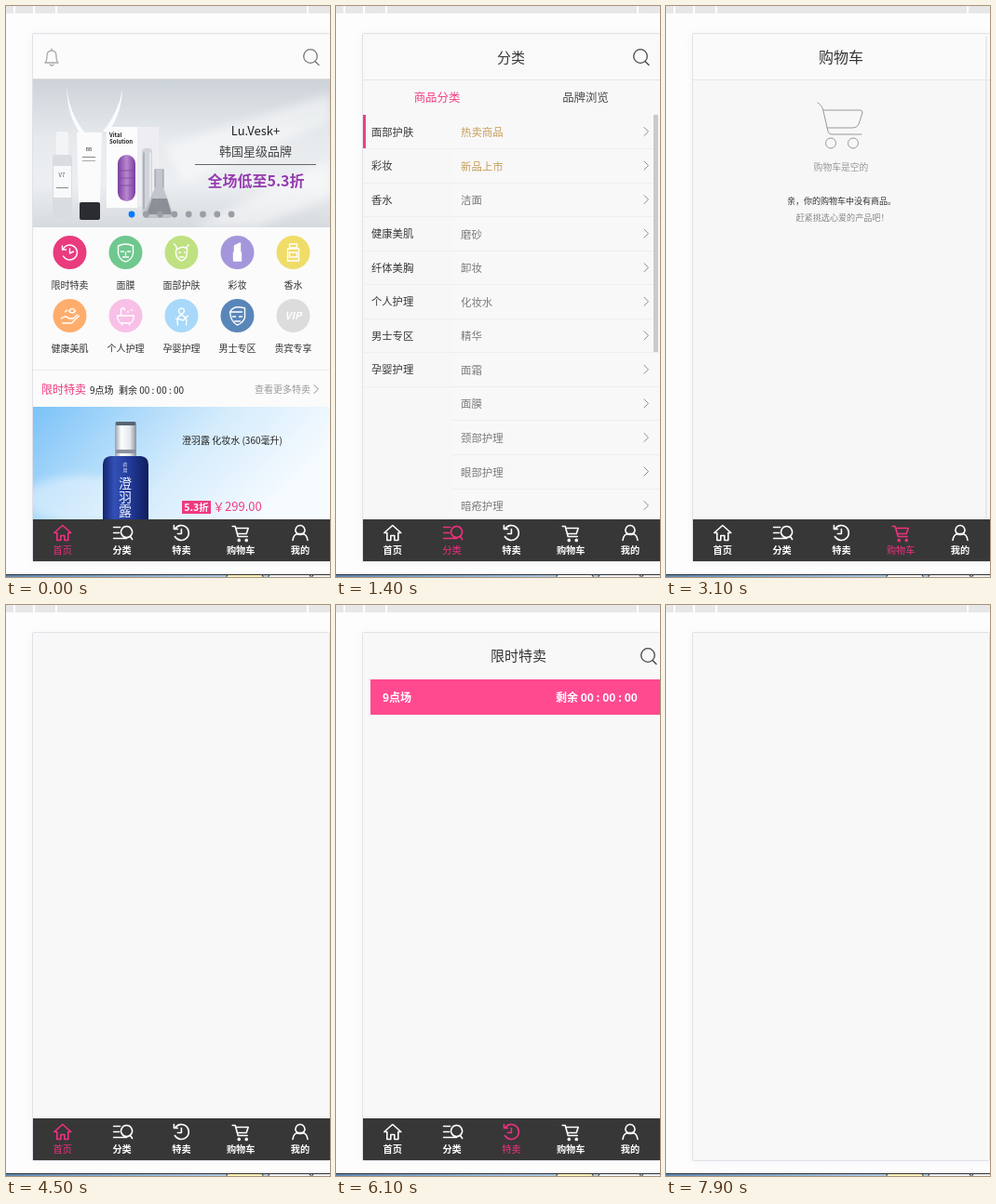
An HTML page that plays this animation: 348x614 px, repeating every 8 s.

```html
<!DOCTYPE html>
<html lang="zh-CN">
<head>
<meta charset="utf-8">
<title>商城</title>
<style>
html, body { margin: 0; width: 100%; height: 100%; overflow: hidden; background: #fdfdfd; }
svg { display: block; width: 348px; height: 614px; font-family: "Noto Sans CJK SC", "Noto Sans CJK", "Noto Sans", sans-serif; }
.line { fill: none; stroke-linecap: round; stroke-linejoin: round; }
.tab { color: #fff; font-weight: 700; }
.tab.on { color: #f0307f; font-weight: 400; }
</style>
</head>
<body>
<svg id="stage" viewBox="0 0 348 614" xmlns="http://www.w3.org/2000/svg"></svg>
<script>
const PINK = '#ef3a80', LOOP = 8000, STEP = 100;

const text = (x, y, size, fill, str, extra = '') =>
  `<text x="${x}" y="${y}" font-size="${size}" fill="${fill}" ${extra}>${str}</text>`;
const mid = (x, y, size, fill, str, extra = '') =>
  text(x, y, size, fill, str, 'text-anchor="middle" ' + extra);
const rect = (x, y, w, h, fill, extra = '') =>
  `<rect x="${x}" y="${y}" width="${w}" height="${h}" fill="${fill}" ${extra}/>`;
const circle = (x, y, r, fill, extra = '') =>
  `<circle cx="${x}" cy="${y}" r="${r}" fill="${fill}" ${extra}/>`;
const line = (d, color, width = 1, extra = '') =>
  `<path class="line" d="${d}" stroke="${color}" stroke-width="${width}" ${extra}/>`;
const shape = (d, fill, extra = '') => `<path d="${d}" fill="${fill}" ${extra}/>`;
const at = (x, y, body, extra = '') => `<g transform="translate(${x} ${y})" ${extra}>${body}</g>`;
const chevron = (x, y) => line(`M${x} ${y - 4.5}l4.5 4.5l-4.5 4.5`, '#888');
const gradient = (id, stops, dir = 'x2="1" y2="0"') =>
  `<linearGradient id="${id}" ${dir}>` + stops.map(([o, c]) =>
    `<stop offset="${o}" stop-color="${c}"/>`).join('') + '</linearGradient>';

const search = color => circle(327, 54, 7.3, 'none', `stroke="${color}" stroke-width="1.3"`) +
  line('M332 59.5l4 4', color, 1.4);
const header = (title, size = 15) => rect(29, 31, 319, 48, '#fafafa') + rect(29, 79, 319, 1, '#e6e6e6') +
  mid(188, 61, size, '#333', title);

const defs = `<defs>
  ${gradient('studio', [[0, '#cdd3d8'], [.4, '#e6eaed'], [.7, '#eceff1'], [1, '#d6dade']], 'x2="0" y2="1"')}
  ${gradient('soft', [[0, '#e7e9ec'], [1, '#d9dde1']])}
  ${gradient('sky', [[0, '#7cc2f8'], [.3, '#a9d8fa'], [.6, '#d5ecfc'], [1, '#f6fbff']], 'x2="1" y2=".35"')}
  ${gradient('cap', [[0, '#9aa0aa'], [.3, '#fff'], [.7, '#e4e7ec'], [1, '#8a919c']])}
  ${gradient('glass', [[0, '#14246f'], [.25, '#3350b5'], [.6, '#213a98'], [1, '#101d5c']])}
  ${gradient('violet', [[0, '#7b3f9d'], [.5, '#b887cf'], [1, '#7a3c9c']])}
  ${gradient('floor', [[0, '#5f86b0'], [.6, '#a8c4de'], [1, '#c4d7e6']])}
  <filter id="blur" x="-20%" y="-20%" width="140%" height="140%"><feGaussianBlur stdDeviation="5"/></filter>
  <clipPath id="banner"><path d="M29 79h319v159H29z"/></clipPath>
  <clipPath id="deal"><path d="M29 431h319v121H29z"/></clipPath>
</defs>`;

function firstSlide() {
  const glow = shape('M170 150L348 95V125L190 190zM200 238L348 165V205L270 238z', '#fff', 'opacity=".45" filter="url(#blur)"');
  const swoosh = shape('M65 87q3 30 22 52h-6Q66 120 65 87zM125 90q-4 24-21 45h6Q124 116 125 90z', '#fbfcfd');
  const serum = rect(54, 135, 13, 26, '#f3f4f5', 'rx="2"') + rect(50, 160, 21, 68, '#d9dde1', 'rx="3"') +
    rect(51, 172, 19, 34, '#f8f9fa') + mid(60, 184, 6, '#555', 'V7') + rect(54, 195, 13, 1, '#888');
  const tube = shape('M76 136h27l-2 75h-23z', '#fbfbfb') + rect(79, 211, 22, 19, '#2b2c31', 'rx="2"') +
    mid(89, 156, 5, '#333', 'BB') + rect(82, 162, 14, 1, '#888') + rect(82, 166, 14, 1, '#aaa');
  const box = rect(108, 130, 33, 87, '#fcfcfc') + rect(141, 130, 23, 86, '#eeeef2') +
    text(111, 141, 6, '#222', 'Vital', 'font-weight="700"') + text(111, 148, 6, '#222', 'Solution', 'font-weight="700"') +
    rect(120, 160, 19, 50, 'url(#violet)', 'rx="9.5"') + line('M121 177h17M121 185h17M121 193h17', '#7d459e', .8);
  const lab = rect(146, 153, 11, 72, '#c3c8ce', 'rx="4" opacity=".7"') + line('M148 158v60', '#7f868e', .8) +
    line('M155 158v60', '#fff') +
    shape('M160 175h9v20l10 28q0 5-5 5h-23q-4 0-3-5l12-28z', '#b4bac1', 'opacity=".75"') +
    shape('M157 207h16l5 17h-27z', '#686d75', 'opacity=".6"') + line('M160 176v19M169 176v19', '#7f868e', .8);
  const words = mid(268, 139, 13, '#222', 'Lu.Vesk+') + mid(268, 161, 13, '#444', '韩国星级品牌') +
    rect(203, 170, 130, 1, '#666') +
    mid(268.5, 194, 16, '#963bb1', '全场低至5.3折', 'font-weight="700"');
  return rect(29, 79, 319, 159, 'url(#studio)') + glow + swoosh + serum + tube + box + lab + words;
}

const nextSlide = () => rect(348, 79, 319, 159, 'url(#soft)');

const entries = [
  ['限时特卖', '#e93b7e', '<path d="M-7-4A8 8 0 1 1-7 4M-8-7v4h4M0-4V1l4-2"/>'],
  ['面膜', '#70c88f', '<path d="M-8-7Q0-11 8-7V1Q7 8 0 10Q-7 8-8 1zM-5-1h3M2-1h3M-3 5h6M0 0v3"/>'],
  ['面部护肤', '#bfe181', '<path d="M-8-9q3 2 3 6Q1-8 6-4q1 11-6 13Q-7 6-6-2M8-8Q4-6 6-4M-3 0h2M3 0h1M-2 5h4"/>'],
  ['彩妆', '#a596db', '<path d="M-3 0v-7l6-3V0M-4 0h8v9h-8z" fill="#fff"/>'],
  ['香水', '#f0dc68', '<path d="M-4-9h8v4h-8zM-6-4h12v13H-6zM-4 0h8v5h-8z"/>'],
  ['健康美肌', '#ffad6c', '<path d="M-9 3q5-4 8 0h5l4-4M-8 8H2l8-8M-1-5q4-5 7 0q-3 4-7 0M-5-4l2-2"/>'],
  ['个人护理', '#f8c0e7', '<path d="M-9 0H9Q8 8 4 8H-4Q-8 8-9 0M-5 0v-7q4-3 4 1M2-4h1M6-6h1M-4 8v2M4 8v2"/>'],
  ['孕婴护理', '#a8d8fa', '<path d="M0-8a3 3 0 1 1-.1 0M-4 10Q-6 1 0-1Q7 2 5 10M-6 3L2 5L7 0"/>'],
  ['男士专区', '#5986b9', '<path d="M-8-4Q-4-12 8-8V2Q6 8 0 10Q-7 7-8-4H5M-5 1h3M2 1h3M-3 6h6"/>'],
  ['贵宾专享', '#dcdcdc', '']
];

function home() {
  const bell = line('M42 61q2-2 2-7q0-6 5-6t5 6q0 5 2 7zM47 63q2 2 4 0M49 46v2', '#aaa', 1.3);
  const dots = Array.from({ length: 8 }, (_, i) =>
    circle(135 + i * 15.3, 224, 3.4, '#8f9499', 'class="dot"')).join('');
  const grid = entries.map(([name, color, icon], i) => {
    const x = 68.5 + i % 5 * 60, y = i < 5 ? 265 : 333;
    const mark = icon ? at(x, y, icon, 'class="line" stroke="#fff" stroke-width="1.4"')
      : mid(x, y + 4, 11, '#fff', 'VIP', 'font-weight="700" font-style="italic"');
    return circle(x, y, 18, color) + mark + mid(x, y + 38.5, 10, '#333', name);
  }).join('');
  const saleRow = rect(29, 391, 319, 1, '#eee') + text(38, 417, 12, PINK, '限时特卖') +
    text(90, 416.5, 10, '#222', '9点场') + text(121, 416.5, 10, '#222', '剩余 00 : 00 : 00') +
    text(267, 416, 10, '#999', '查看更多特卖') + chevron(331, 412);
  const bottle = rect(117, 447, 23, 38, 'url(#cap)', 'rx="2"') + rect(118, 447, 21, 4, '#596473', 'rx="1"') +
    rect(118, 477, 21, 4, '#8a93a0') +
    shape('M104 493q0-8 8-9h33q8 1 8 9v60h-49z', 'url(#glass)') +
    mid(128, 495, 5, '#dfe8ff', '药') + mid(128, 501, 5, '#dfe8ff', '用') +
    [...'澄羽露'].map((c, i) => mid(128, 518 + i * 15, 14, '#f2f5ff', c)).join('');
  const deal = rect(29, 431, 319, 121, 'url(#sky)') +
    `<ellipse cx="80" cy="530" rx="60" ry="25" fill="#fff" opacity=".4" filter="url(#blur)"/>` + bottle;
  return rect(29, 31, 319, 521, '#fbfbfb') + bell + search('#777') + rect(29, 78, 319, 1, '#ddd') +
    `<g clip-path="url(#banner)"><g id="slides">${firstSlide()}${nextSlide()}</g>${dots}</g>` + grid + saleRow +
    `<g clip-path="url(#deal)">${deal}</g>` + text(189, 471, 10, '#222', '澄羽露 化妆水 (360毫升)') +
    rect(189, 532, 31, 14, PINK) + mid(204.5, 543, 10.5, '#fff', '5.3折', 'font-weight="700"') +
    text(222, 543, 13, PINK, '￥299.00');
}

function category() {
  const kinds = ['面部护肤', '彩妆', '香水', '健康美肌', '纤体美胸', '个人护理', '男士专区', '孕婴护理'];
  const items = ['热卖商品', '新品上市', '洁面', '磨砂', '卸妆', '化妆水', '精华', '面霜', '面膜', '颈部护理', '眼部护理', '暗疮护理'];
  const row = 36.55;
  return rect(29, 31, 319, 521, '#f9f9f9') + header('分类') + search('#444') +
    mid(108.5, 103, 12.4, PINK, '商品分类') + mid(268, 103, 12.4, '#444', '品牌浏览') +
    rect(29, 117, 95, 435, '#f7f7f7') + rect(29, 117, 95, 37, '#f9f9f9') + rect(29, 117, 3, 37, PINK) +
    kinds.map((s, i) => text(38, 139.5 + i * row, 11.3, '#333', s, 'font-weight="500"') +
      rect(29, Math.round(153 + i * row), 95, 1, '#efefef')).join('') +
    items.map((s, i) => text(134, 140 + i * row, 11.4, i < 2 ? '#c79b55' : '#777', s) +
      chevron(331, 135 + i * row) + (i < 11 ? rect(124, Math.round(153 + i * row), 224, 1, '#eee') : '')).join('') +
    rect(341, 117, 5, 255, '#c9c9c9', 'rx="1"');
}

const sale = () => rect(29, 31, 319, 521, '#f8f8f8') + mid(196, 60, 15, '#333', '限时特卖') +
  at(8, 0, search('#444')) + rect(37, 80, 311, 38, '#ff4a90') +
  text(50, 104, 12, '#fff', '9点场', 'font-weight="700"') +
  text(236, 104, 12, '#fff', '剩余 00 : 00 : 00', 'font-weight="700"');

const cart = () => rect(29, 31, 319, 521, '#f7f7f7') + header('购物车', 16) +
  line('M163 104q5 3 6 9l5 22q1 3 4 3h32M169 112h40q2 0 2 3l-4 12q-2 4-6 4h-28', '#999') +
  circle(177, 147.5, 5.5, 'none', 'stroke="#999"') + circle(201, 147.5, 5.5, 'none', 'stroke="#999"') +
  mid(188, 177, 9.8, '#999', '购物车是空的') +
  text(130, 212.5, 9, '#333', '亲，你的购物车中没有商品。', 'font-weight="500"') +
  text(139.5, 231, 9.1, '#888', '赶紧挑选心爱的产品吧！') + rect(343, 33, 2, 518, '#e9e9e9');

const tabs = [
  ['首页', 'M-9 0L0-8L9 0H6V8H2V3H-2V8H-6V0z'],
  ['分类', 'M5-7a6 6 0 1 1-.1 0M9 4l2 3M-9-6h7M-9 0h6M-9 6H5'],
  ['特卖', 'M-7-4A8 8 0 1 1-7 4M-8-8v4h4M0-4V1H-4'],
  ['购物车', 'M-9-7h3L-3 4H7M-5-5H8L6 1H-4M-2 7a1 1 0 1 0 .1 0M6 7a1 1 0 1 0 .1 0'],
  ['我的', 'M0-8a5 5 0 1 1-.1 0M-8 8Q-7 1-2 1H2Q7 1 8 8']
];
const nav = () => rect(29, 552, 319, 45, '#373737') + tabs.map(([name, icon], i) => {
  const x = 60.8 + i * 63.8;
  return `<g class="tab">${at(x, 566.5, line(icon, 'currentColor', 1.6))}${mid(x, 589, 10.2, 'currentColor', name)}</g>`;
}).join('');

const page = (id, body) => `<g id="${id}">${body}</g>`;
document.getElementById('stage').innerHTML = defs + rect(0, 0, 348, 614, '#fdfdfd') +
  rect(0, 0, 348, 8, '#e7e7e7') + [8, 29, 53, 323].map(x => rect(x, 0, 2, 8, '#fff')).join('') +
  rect(28, 30, 324, 568, '#dcdde2', 'filter="url(#blur)" opacity=".3"') +
  rect(28.5, 29.5, 319, 568, '#f8f8f8', 'stroke="#e0e1e8" rx="1"') +
  page('home', home()) + page('category', category()) + page('sale', sale()) +
  page('cart', cart()) + page('nav', nav()) +
  rect(0, 611, 348, 1, '#30343a') + rect(0, 612, 348, 2, 'url(#floor)') +
  rect(237, 611.5, 39, 4, '#fff', 'id="flash" stroke="#333" rx="2"') +
  rect(282, 611.5, 45, 4, '#eef1f4', 'stroke="#333" rx="2"') + rect(329, 611.5, 30, 4, '#eef1f4', 'stroke="#333" rx="2"');

// [time, value] pairs, linear in between
const tracks = {
  home: [[1100, 1], [1200, .5], [1300, 0], [4500, 0], [4600, .3], [4700, .7], [4800, 1], [4900, 1],
    [5300, 0], [7000, 0], [7300, 1], [7500, 1], [7900, 0]],
  category: [[1200, 0], [1300, .55], [1400, .97], [1500, 1], [1700, 1], [1900, 0]],
  sale: [[1900, 0], [2000, .2], [2200, 1], [2400, 1], [2600, 0], [5300, 0], [5400, .21], [5500, .65],
    [5600, 1], [6900, 1], [7000, 0]],
  cart: [[2600, 0], [2700, .5], [2800, .95], [3000, .97], [3100, 1], [3400, 0]],
  nav: [[7500, 1], [7900, 0]]
};
const slide = [[500, 0], [600, .15], [700, .5], [800, .78], [900, .94], [1000, 1]];
const activeTab = [[0, 0], [1200, 1], [1700, 2], [2400, 3], [3200, 4], [4500, 0], [5000, 2], [7000, 0]];

function valueAt(track, t) {
  const i = track.findIndex(([time]) => time > t);
  if (i < 0) return track[track.length - 1][1];
  if (i === 0) return track[0][1];
  const [t0, a] = track[i - 1], [t1, b] = track[i];
  return a + (b - a) * (t - t0) / (t1 - t0);
}

const find = id => document.getElementById(id);
const tabNodes = document.querySelectorAll('.tab'), dotNodes = document.querySelectorAll('.dot');

function render(t) {
  for (const id in tracks) {
    const opacity = valueAt(tracks[id], t);
    find(id).setAttribute('opacity', opacity);
    find(id).style.display = opacity > 0 ? '' : 'none';
  }
  const shift = t < 4500 ? valueAt(slide, t) : 0;
  find('slides').setAttribute('transform', `translate(${-319 * shift} 0)`);
  dotNodes.forEach((dot, i) => dot.setAttribute('fill', i === Math.round(shift) ? '#007aff' : '#9a9fa5'));
  const active = activeTab.filter(([time]) => time <= t).pop()[1];
  tabNodes.forEach((tab, i) => tab.classList.toggle('on', i === active));
  const lit = Math.floor(Math.min(t, 3600) / 200) % 2 === 0;
  find('flash').setAttribute('fill', lit ? '#fff0b8' : '#fff');
}

const start = performance.now();
function tick() {
  const t = (performance.now() - start) % LOOP;
  render(Math.floor(t / STEP) * STEP);
  requestAnimationFrame(tick);
}
tick();
</script>
</body>
</html>
```
